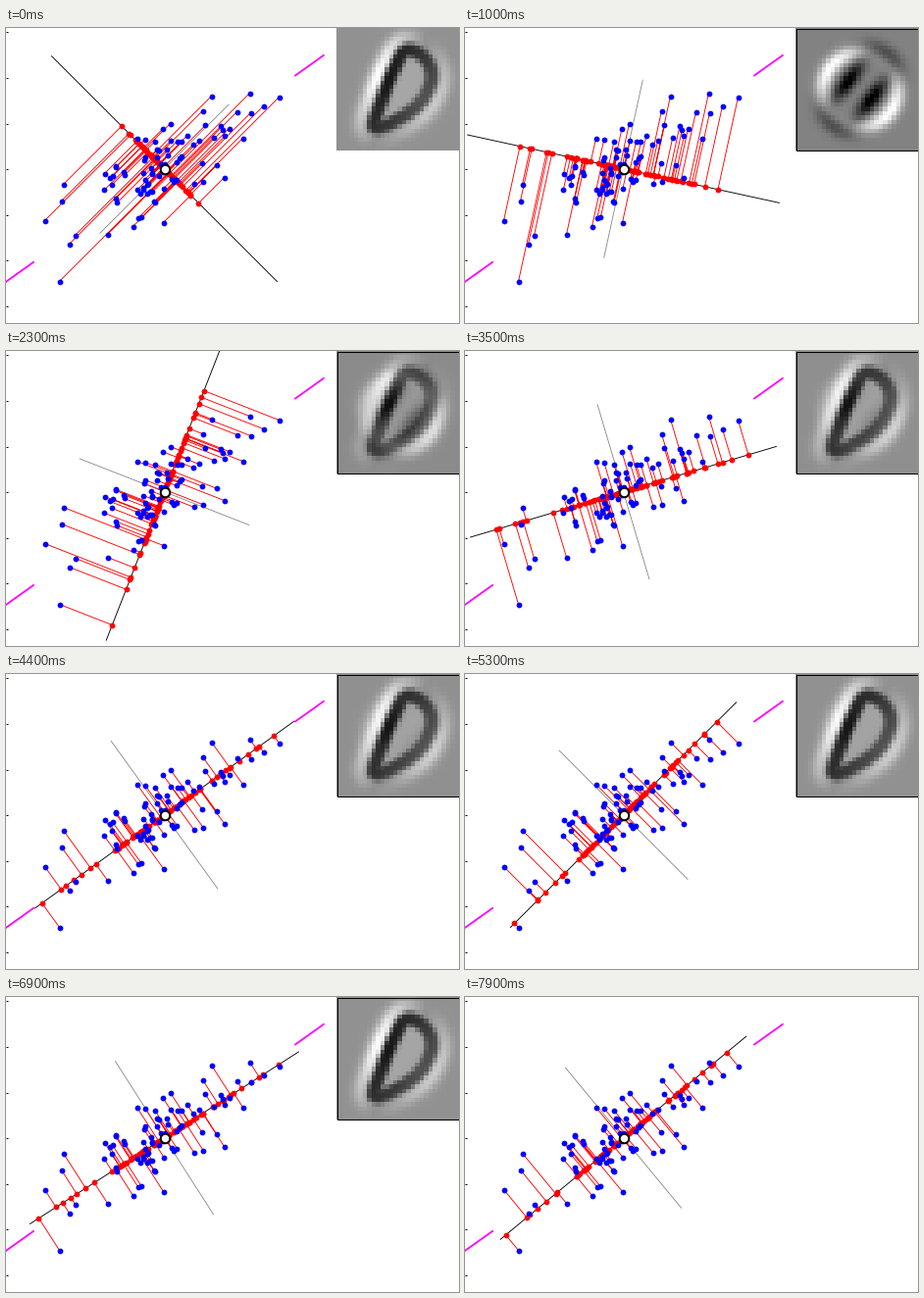
Recreate the animation shown at these times as a matplotlib script. Size 462 px wide and 301 px high, loop 8000 ms.

```python
import numpy as np
import matplotlib.pyplot as plt
from matplotlib.animation import FuncAnimation
from matplotlib.path import Path

W, H, DPI = 462, 301, 64
PX = 72 / DPI                      # one pixel in points
FRAMES, STEP = 80, 100
CENTER = np.array([161.0, 143.2])
UNIT = 46.6                        # pixels per data unit
REST = 35.5                        # direction of largest variance, degrees
SHOW_PARTS, HIDE_IMAGE = 10, 70


def unit(deg):
    """Direction on screen, where y points down."""
    a = np.radians(deg)
    return np.array([np.cos(a), -np.sin(a)])


def scatter_points(n=64):
    """Dense tilted cloud plus its outermost points."""
    rng = np.random.default_rng(4)
    disc = rng.normal(0, 0.5, (n, 2))
    r = np.hypot(*disc.T)[:, None]
    disc *= np.minimum(1, 1 / r)
    core = disc @ np.array([72 * unit(REST), 36 * unit(REST + 90)])
    outer = [(58, 159), (56, 176), (39, 196), (70, 211), (64, 220), (54, 258),
             (100, 148), (103, 210), (133, 112), (129, 202), (160, 198),
             (167, 97), (200, 84), (209, 69), (227, 102), (235, 85),
             (241, 112), (248, 66), (262, 79), (249, 86), (278, 70),
             (222, 152)]
    return np.vstack([outer, CENTER + core])


def swing():
    """Damped rotation of the axis pulled by springs to the points."""
    angle, speed, out = -45.0, 0.0, []
    for _ in range(FRAMES):
        out.append(angle)
        speed = 0.93 * (speed - 1.64 * np.sin(2 * np.radians(angle - REST)))
        angle += speed
    return out


def smooth_loop(knots, n=16):
    """Closed Catmull-Rom curve."""
    p = np.array(knots, float)
    a, b, c, d = (np.roll(p, k, axis=0)[:, None] for k in (1, 0, -1, -2))
    t = np.linspace(0, 1, n, endpoint=False)[None, :, None]
    curve = 0.5 * (2 * b + (c - a) * t + (2 * a - 5 * b + 4 * c - d) * t**2
                   + (3 * b - a - 3 * c + d) * t**3)
    return curve.reshape(-1, 2)


def bump(x, width, power=2):
    return np.exp(-np.abs(x / width) ** power)


side = (np.arange(28) + 0.5) * 125 / 28
GX, GY = np.meshgrid(side + 337, side)


def digit():
    """Sharp zero with a bright rim."""
    loop = smooth_loop([(409, 23), (427, 31), (434, 50), (424, 74),
                        (402, 92), (376, 101), (384, 72), (396, 42)])
    grid = np.column_stack([GX.ravel(), GY.ravel()])
    dist = np.hypot(*(grid[:, None] - loop[None]).transpose(2, 0, 1))
    dist = dist.min(axis=1).reshape(28, 28)
    inside = Path(loop).contains_points(grid).reshape(28, 28)
    dx, dy = GX - 404, GY - 62
    v = (-0.87 * dx - 0.45 * dy) / (np.hypot(dx, dy) + 4)
    rim = (0.5 * np.maximum(v, 0) + 0.25 * np.maximum(-v, 0)) * ~inside
    img = 0.57 + rim * bump(dist - 13, 8) + 0.08 * inside
    ink = 0.20 - 0.14 * v
    return np.clip(img + (ink - img) * bump(dist, 7.2, 4), 0, 1)


def first_part():
    """Smooth two-lobed pattern."""
    dx, dy = GX - 403, GY - 63
    s, p = 0.6 * dx - 0.8 * dy, 0.8 * dx + 0.6 * dy
    r = np.hypot(s, p) + 1e-6
    img = 0.51 + 0.5 * bump(r - 38, 8) * (0.1 + 0.9 * (p / r) ** 2)
    img -= 0.55 * bump(np.abs(p) - 15, 8) * bump(s, 23)
    img -= 0.22 * bump(r - 46, 8) * (s / r) ** 6
    return np.clip(img, 0, 1)


points = scatter_points()
angles = swing()
FULL, PART = digit(), first_part()

fig = plt.figure(figsize=(W / DPI, H / DPI), dpi=DPI, facecolor="white")
ax = fig.add_axes([0, 0, 1, 1])


def stroke(color, width=0.9):
    return ax.plot([], [], color=color, lw=width * PX,
                   solid_capstyle="butt")[0]


def dots(color):
    return ax.plot([], [], "o", color=color, ms=5.8 * PX, mew=0,
                   snap=False)[0]


def span(line, direction, start, end):
    ends = CENTER + np.array([[start], [end]]) * UNIT * direction
    line.set_data(*ends.T)


picture = ax.imshow(FULL, cmap="gray", vmin=0, vmax=1, aspect="auto",
                    interpolation="nearest", extent=(336.5, 461.5, 124.5, -0.5))
frame = stroke("black", 1)
frame.set_data([337, 461, 461, 337, 337], [0, 0, 124, 124, 0])

for k in range(-3, 4):
    y = round(CENTER[1] + k * UNIT)
    stroke("black", 1).set_data([-0.5, 1.5], [y, y])
for sign in (-1, 1):
    span(stroke("magenta", 1.8), sign * unit(REST), 3.5, 4.3)

cross, axis, stems = stroke("#808080", 0.8), stroke("black"), stroke("red")
feet, cloud = dots("red"), dots("blue")
cloud.set_data(*points.T)
ax.plot(*CENTER, "o", mfc="white", mec="black", ms=9.5 * PX, mew=2 * PX,
        snap=False)

ax.set_xlim(-0.5, W - 0.5)
ax.set_ylim(H - 0.5, -0.5)
ax.axis("off")


def update(i):
    w = unit(angles[i])
    span(axis, w, -3.5, 3.5)
    span(cross, unit(angles[i] + 90), -2, 2)
    proj = CENTER + np.outer((points - CENTER) @ w, w)
    feet.set_data(*proj.T)
    gaps = np.full_like(points, np.nan)
    stems.set_data(*np.stack([points, proj, gaps], axis=1).reshape(-1, 2).T)

    mix = 1 if i < SHOW_PARTS else 1 - np.exp(-(i - SHOW_PARTS) / 14)
    picture.set_data(PART + (FULL - PART) * mix)
    picture.set_visible(i < HIDE_IMAGE)
    frame.set_visible(SHOW_PARTS <= i < HIDE_IMAGE)
    return picture, frame, cross, axis, stems, feet


anim = FuncAnimation(fig, update, frames=FRAMES, interval=STEP,
                     repeat=True, repeat_delay=0, blit=False)
plt.show()
```
